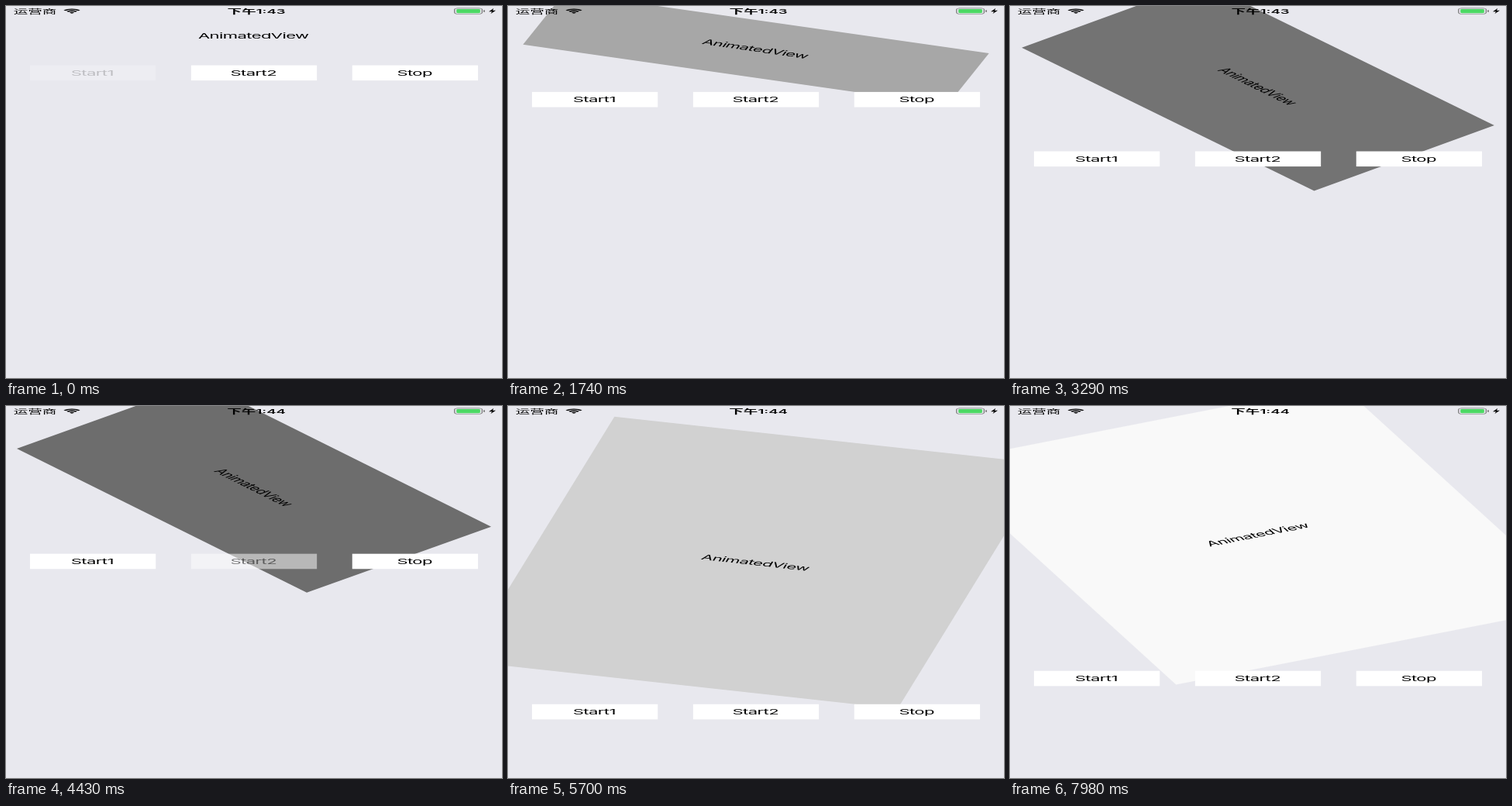
An HTML page with a canvas for the animation above (8 s loop, 640 by 480 pixels).

```html
<!DOCTYPE html>
<html lang="zh">
<head>
<meta charset="utf-8">
<style>
  html, body { margin: 0; width: 640px; height: 480px; overflow: hidden; background: #e8e8ee; }
  canvas { display: block; }
</style>
</head>
<body>
<canvas id="stage" width="640" height="480"></canvas>
<script>
const ctx = document.getElementById('stage').getContext('2d');
const LOOP = 8000, W = 414, H = 736; // the phone screen in points, squeezed onto the stage
const GROW = 4393, TURN = 4310, HALT = 7515, RETURN = 7600;
const SANS = 'Inter, "Noto Sans CJK SC", "Noto Sans CJK", sans-serif';

const progress = (t, start, duration) => Math.min(1, Math.max(0, (t - start) / duration));
const ease = (t, start, duration) => .5 - .5 * Math.cos(Math.PI * progress(t, start, duration));

// Eased moves for Start1, Start2 and Stop; Stop also snaps the layout first.
function pose(t) {
  const spin = ease(t, 450, 3080), unfold = ease(t, 860, 2620), push = ease(t, 680, 2850);
  const turn = ease(t, TURN, 3000), grow = ease(t, GROW, 750);
  const halt = t < HALT ? 0 : 1, back = ease(t, RETURN, 2850);
  return {
    angle: 50 * spin - 80 * turn + 4 * halt + 26 * back,
    center: 59.2 + 101.3 * unfold + 149.5 * grow - 47 * halt - 204 * back,
    height: 77 + 123 * unfold + 300 * grow - 423 * back,
    buttons: 117.3 + 173.2 * push + 299.5 * grow - 47.5 * halt - 425 * back,
    gray: 232 - 124 * progress(t, 450, 3080) ** .74 + 147 * ease(t, TURN, 2235) - 139 * back
  };
}

// A button dims while touched and fades back after release.
const touch = (t, down, up) => t < down ? 1 : .2 + .8 * ease(t, up, 580);

function text(str, x, y, font, spacing = 0) {
  ctx.font = font + ' ' + SANS;
  ctx.letterSpacing = spacing + 'px';
  ctx.fillStyle = '#000';
  ctx.fillText(str, x + spacing / 2, y);
}

const label = (str, x, y) => text(str, x - .3, y, '14.3px', -.4);

function view(t, { angle, center, height, gray }) {
  ctx.save();
  ctx.translate(W / 2, center);
  ctx.rotate(angle * Math.PI / 180);
  if (t > 450) {
    ctx.fillStyle = `rgb(${gray},${gray},${gray})`;
    ctx.fillRect(-187, -height / 2, 374, height);
  }
  label('AnimatedView', 0, 5);
  ctx.restore();
}

function button(str, i, y, alpha) {
  const x = 20 + 134.5 * i;
  ctx.globalAlpha = alpha;
  ctx.fillStyle = '#fff';
  ctx.fillRect(x, y, 105, 30);
  label(str, x + 52.5, y + 20);
  ctx.globalAlpha = 1;
}

function wifi(x, y) {
  const arc = r => { ctx.beginPath(); ctx.arc(x, y, r, -Math.PI * .75, -Math.PI * .25); };
  ctx.strokeStyle = ctx.fillStyle = '#000';
  ctx.lineWidth = 2.1;
  for (const r of [8.7, 5.4]) { arc(r); ctx.stroke(); }
  arc(3);
  ctx.lineTo(x, y);
  ctx.fill();
}

function roundBox(x, y, w, h, r) {
  ctx.beginPath();
  ctx.roundRect(x, y, w, h, r);
}

function battery() {
  ctx.lineWidth = .8;
  ctx.strokeStyle = '#777';
  roundBox(374.4, 4.4, 23, 11.2, 2.5);
  ctx.stroke();
  ctx.fillStyle = '#4cd964';
  roundBox(376, 6, 19.8, 8, 1.2);
  ctx.fill();
  ctx.fillStyle = '#777';
  roundBox(398.5, 8, 1.2, 4, .6);
  ctx.fill();
  ctx.fillStyle = '#000';
  ctx.fill(new Path2D('M407 4.5 L403 11 H405.6 L404.6 15.5 L408.8 9 H406.2 Z'));
}

function statusBar(t) {
  text('运营商', 24.3, 14.6, '12px');
  wifi(55, 15);
  text(t < 4090 ? '下午1:43' : '下午1:44', 209, 14.6, '600 12px');
  battery();
}

function draw(now) {
  const t = now % LOOP, p = pose(t);
  ctx.setTransform(640 / W, 0, 0, 480 / H, 0, 0);
  ctx.fillStyle = '#e8e8ee';
  ctx.fillRect(0, 0, W, H);
  ctx.textAlign = 'center';
  view(t, p);
  button('Start1', 0, p.buttons, touch(t, 0, 430));
  button('Start2', 1, p.buttons, touch(t, 4090, 4180));
  button('Stop', 2, p.buttons, touch(t, 7450, HALT - 100));
  statusBar(t);
  requestAnimationFrame(draw);
}
requestAnimationFrame(draw);
</script>
</body>
</html>
```
